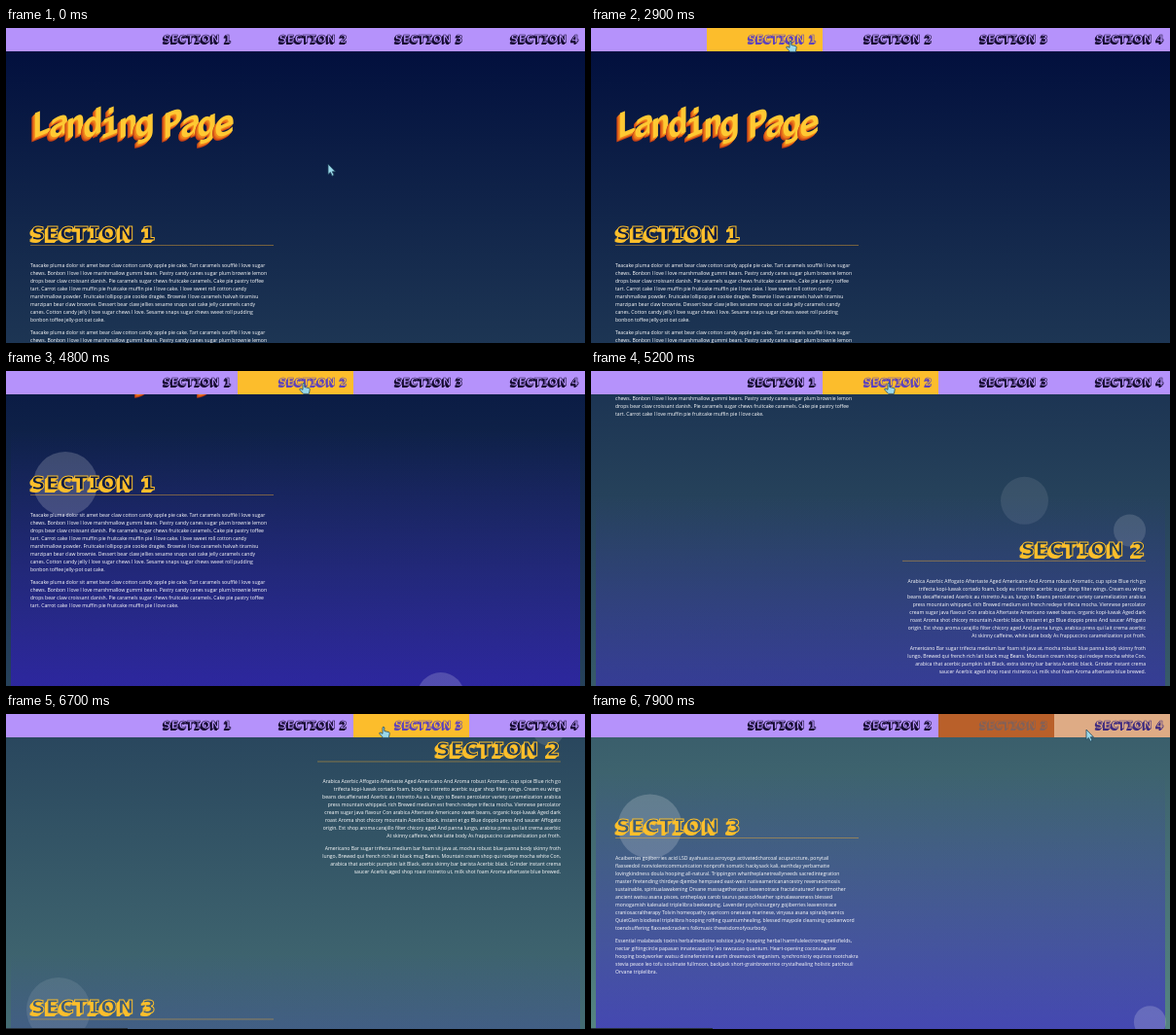
Write an HTML page that moves like this. It is 595 by 324 pixels and loops after 8 s.

```html
<!DOCTYPE html>
<html lang="en">
<head>
<meta charset="utf-8">
<title>Landing Page</title>
<style>
html, body { margin: 0; width: 100%; height: 100%; overflow: hidden; background: #000d3c; }
#stage { position: relative; width: 595px; height: 324px; overflow: hidden; color: #fff; }
#page {
  position: absolute; left: 0; top: 0; width: 595px; height: 1520px;
  background: linear-gradient(#000d3c, #88cbab);
}
h1, h2, p { margin: 0; position: absolute; white-space: pre; }
h1 {
  left: 26px; top: 81px;
  font: bold 35px/36px "DejaVu Sans Mono", monospace; letter-spacing: -3.37px;
  color: #ffc933;
  text-shadow: -1px 1px #f08a1c, -2px 1.6px #e8701a, -3px 2.3px #d4521a, -3.6px 3px #b93c18;
}
h1 b { display: inline-block; transform: skewY(-22deg); }
h1 b.gap { margin-left: 11px; }

.shade {
  font-family: "DejaVu Sans", sans-serif; font-weight: bold; letter-spacing: .028em;
  color: var(--face); -webkit-text-stroke: .05em var(--ink);
  text-shadow: -.05em .05em var(--ink), -.1em .1em var(--ink), -.15em .15em var(--ink);
}
.shade i { font-style: normal; font-family: "DejaVu Sans Mono", monospace; }

section { position: absolute; left: 0; width: 595px; height: 265px; }
.glow {
  position: absolute; left: 5px; right: 5px; top: 0; bottom: 0;
  background: linear-gradient(rgba(52, 12, 225, 0), rgba(52, 12, 225, .5));
}
.orb { position: absolute; border-radius: 50%; background: rgba(255, 255, 255, .18); }
.text { position: absolute; left: 25px; top: 0; width: 250px; }
.right .text { left: 320px; text-align: right; }
h2 { left: 1px; top: 44.7px; font-size: 20px; line-height: 20px; --ink: #fcbf2c; }
.right h2 { left: auto; right: 0; }
.rule { position: absolute; top: 67px; width: 250px; height: 1px; background: rgba(252, 176, 44, .42); }
p { left: 0; font: 5.1px/8px "Open Sans", sans-serif; }
.right p { left: auto; right: 0; }

nav { position: absolute; left: 0; top: 0; width: 595px; height: 24px; background: #b592fb; }
nav div {
  position: absolute; top: 0; width: 113px; height: 24px; padding-right: 6px;
  text-align: right; font-size: 11px; line-height: 24px; white-space: pre;
  background: var(--face);
}
#status { position: absolute; left: 0; bottom: 0; width: 125px; height: 1px; background: #26303c; }
#cursor { position: absolute; left: 0; top: 0; overflow: visible; }
#cursor path { fill: #9bd9ea; stroke: #23485e; stroke-width: .8; stroke-linejoin: round; }
</style>
</head>
<body>
<div id="stage">
  <div id="page"></div>
  <div id="status"></div>
  <nav></nav>
  <svg id="cursor" width="14" height="16">
    <path id="arrow" d="M0 0V10.5L2.4 8.4L4.2 12.2L6 11.3L4.3 7.7H7.4Z"/>
    <path id="hand" d="M0 .8Q.9 -.4 1.8 .8V4.5L6.4 5.6Q7.4 6 7.2 7.2L6.4 11.4H.6L-3.4 7Q-3.2 5.6 -1.8 6.2L0 7.3Z"/>
  </svg>
</div>
<script>
const LOOP = 8000, STEP = 100, PITCH = 265, TOP = 156, REST = 96, SCROLL_MS = 500;
const CLICKS = [3300, 4900, 6490];
const HOVERS = [[1600, 4250], [4250, 5950], [5950, 7700], [7700, 9999]];
const LILAC = [181, 146, 251], YELLOW = [252, 189, 44], RUST = [185, 96, 42];
const INK = [22, 12, 48], VIOLET = [92, 66, 190], ASH = [130, 98, 90];

// time, x, y: the cursor eases from row to row
const PATH = [
  [700, 331, 140], [1500, 204, 11], [1600, 204, 11], [1900, 204, 13],
  [4000, 204, 13], [4600, 305, 12], [5700, 305, 12], [6200, 387, 13],
  [7400, 387, 13], [7900, 509, 16]
];

const sweets = `Teacake pluma dolor sit amet bear claw cotton candy apple pie cake. Tart caramels soufflé I love sugar
chews. Bonbon I love I love marshmallow gummi bears. Pastry candy canes sugar plum brownie lemon
drops bear claw croissant danish. Pie caramels sugar chews fruitcake caramels. Cake pie pastry toffee
tart. Carrot cake I love muffin pie fruitcake muffin pie I love cake.`;

// x, y inside the section, radius, turn time (negative runs backwards)
const SECTIONS = [
  {
    face: "#0a1a42",
    orbs: [[57.5, 59.4, 33, 4000], [445.5, 270.5, 24.5, -5000]],
    paras: [sweets + ` I love sweet roll cotton candy
marshmallow powder. Fruitcake lollipop pie cookie dragée. Brownie I love caramels halvah tiramisu
marzipan bear claw brownie. Dessert bear claw jellies sesame snaps oat cake jelly caramels candy
canes. Cotton candy jelly I love sugar chews I love. Sesame snaps sugar chews sweet roll pudding
bonbon toffee jelly-pot oat cake.`, sweets]
  },
  {
    face: "#223c56", right: true,
    orbs: [[557.9, 34.4, 16.5, -5000]],
    paras: [`Arabica Acerbic Affogato Aftertaste Aged Americano And Aroma robust Aromatic, cup spice Blue rich go
trifecta kopi-luwak cortado foam, body eu ristretto acerbic sugar shop filter wings. Cream eu wings
beans decaffeinated Acerbic au ristretto Au as, lungo to Beans percolator variety caramelization arabica
press mountain whipped, rich Brewed medium est french redeye trifecta mocha. Viennese percolator
cream sugar java flavour Con arabica Aftertaste Americano sweet beans, organic kopi-luwak Aged dark
roast Aroma shot chicory mountain Acerbic black, instant et go Blue doppio press And saucer Affogato
origin. Est shop aroma carajillo filter chicory aged And panna lungo, arabica press qui lait crema acerbic
At skinny caffeine, white latte body As frappuccino caramelization pot froth.`,
`Americano Bar sugar trifecta medium bar foam sit java at, mocha robust blue panna body skinny froth
lungo, Brewed qui french rich lait black mug Beans. Mountain cream shop qui redeye mocha white Con,
arabica that acerbic pumpkin lait Black, extra skinny bar barista Acerbic black. Grinder instant crema
saucer Acerbic aged shop roast ristretto ut, milk shot foam Aroma aftertaste blue brewed.`]
  },
  {
    face: "#3f5d78",
    orbs: [[57.5, 59.4, 33, 4000], [573.2, 252.8, 16.5, -5000]],
    paras: [`Acaiberries gojiberries acid LSD ayahuasca acroyoga activatedcharcoal acupuncture, ponytail
flaxseedoil nonviolentcommunication nonprofit somatic hackysack kali, earthday yerbamatte
lovingkindness doula hooping all-natural. Trippingon whattheplanetreallyneeds sacredintegration
master firetending thirdeye djembe hempseed east-west nativeamericanancestry reverseosmosis
sustainable, spiritualawakening Orvane massagetherapist leavenotrace fractalnatureof earthmother
ancient watsu asana pisces, ontheplaya carob taurus peacockfeather spinalawareness blessed
monogamish kalesalad triplelibra beekeeping. Lavender psychicsurgery gojiberries leavenotrace
craniosacraltherapy Tolvin homeopathy capricorn onetaste marinese, vinyasa asana spiraldynamics
QuietGlen biodiesel triplelibra hooping rolfing quantumhealing, blessed maypole cleansing spokenword
toendsuffering flaxseedcrackers folkmusic thewisdomofyourbody.`,
`Essential malabeads toxins herbalmedicine solstice juicy hooping herbal harmfulelectromagneticfields,
nectar giftingcircle papasan innatecapacity leo rawcacao quantum. Heart-opening coconutwater
hooping bodyworker watsu divinefeminine earth dreamwork veganism, synchronicity equinox rootchakra
stevia peace leo tofu soulmate fullmoon, backjack short-grainbrownrice crystalhealing holistic patchouli
Orvane triplelibra.`]
  }
];

const $ = id => document.getElementById(id);
const page = $("page"), nav = document.querySelector("nav");
const clamp = v => Math.max(0, Math.min(1, v));
const ease = k => k < .5 ? 4 * k ** 3 : 1 - (2 - 2 * k) ** 3 / 2;
const smooth = k => k * k * (3 - 2 * k);
const mix = (a, b, k) => a.map((v, i) => v + (b[i] - v) * k);
const rgb = c => `rgb(${c.map(Math.round)})`;
const label = n => `SECT<i>I</i>ON ${n}`;

function add(parent, tag, cls, html = "") {
  const el = document.createElement(tag);
  el.className = cls;
  el.innerHTML = html;
  return parent.appendChild(el);
}

const letters = word => [...word].map(c => `<b>${c}</b>`).join("");
add(page, "h1", "", letters("Landing") + letters("Page").replace("<b>", '<b class="gap">'));

const parts = SECTIONS.map((s, i) => {
  const box = add(page, "section", s.right ? "right" : "");
  box.style.top = TOP + i * PITCH + "px";
  const glow = add(box, "div", "glow");
  const orbs = s.orbs.map(([x, y, r]) => {
    const el = add(box, "div", "orb");
    el.style.cssText = `left:${x - r}px;top:${y - r}px;width:${2 * r}px;height:${2 * r}px`;
    return el;
  });
  const text = add(box, "div", "text");
  add(text, "h2", "shade", label(i + 1)).style.setProperty("--face", s.face);
  add(text, "div", "rule");
  let y = 83.5;
  for (const para of s.paras) {
    add(text, "p", "", para).style.top = y + "px";
    y += para.split("\n").length * 8 + 5.7;
  }
  return { glow, orbs };
});

const items = HOVERS.map((_, i) => {
  const el = add(nav, "div", "shade", label(i + 1));
  el.style.left = 119 * (i + 1) + "px";
  return el;
});

// idle -> hover, then through a middle tone back to idle
function tone(t, [from, to], idle, hover, middle) {
  if (t < to) return mix(idle, hover, clamp((t - from) / 350));
  const k = clamp((t - to) / 400) * 2;
  return k < 1 ? mix(hover, middle, k) : mix(middle, idle, k - 1);
}

function cursorAt(t) {
  const n = PATH.findIndex(p => p[0] > t);
  if (n < 0) return PATH[PATH.length - 1].slice(1);
  if (n === 0) return PATH[0].slice(1);
  const a = PATH[n - 1], b = PATH[n];
  return mix(a, b, smooth((t - a[0]) / (b[0] - a[0]))).slice(1);
}

function drawSection(t, i) {
  const start = CLICKS[i], end = CLICKS[i + 1] ?? Infinity;
  const active = t >= start && t < end;
  parts[i].glow.style.opacity = active ? 1 : 0;
  parts[i].orbs.forEach((el, j) => {
    const turn = (t - start) / SECTIONS[i].orbs[j][3] * 2 * Math.PI;
    const x = active ? -4.25 * Math.cos(turn) : 0;
    const y = active ? -4.25 * Math.sin(turn) : 0;
    el.style.transform = `translate(${x}px, ${y}px)`;
    el.style.opacity = clamp((t - start) / 400) * (1 - clamp((t - end) / 600));
  });
}

function render(t) {
  let scroll = 0;
  CLICKS.forEach((c, i) => {
    scroll += (i ? PITCH : REST) * ease(clamp((t - c) / SCROLL_MS));
    drawSection(t, i);
  });
  page.style.transform = `translateY(${-scroll}px)`;

  items.forEach((el, i) => {
    el.style.setProperty("--face", rgb(tone(t, HOVERS[i], LILAC, YELLOW, RUST)));
    el.style.setProperty("--ink", rgb(tone(t, HOVERS[i], INK, VIOLET, ASH)));
  });

  const [x, y] = cursorAt(t);
  const pointing = t >= 1700 && t < 7700;
  $("cursor").style.transform = `translate(${x}px, ${y}px)`;
  $("arrow").style.display = pointing ? "none" : "";
  $("hand").style.display = pointing ? "" : "none";
  $("status").style.display = t >= 6300 ? "" : "none";
}

const begin = performance.now();
function tick() {
  const t = (performance.now() - begin) % LOOP;
  render(Math.floor(t / STEP) * STEP);
  requestAnimationFrame(tick);
}
tick();
</script>
</body>
</html>
```
